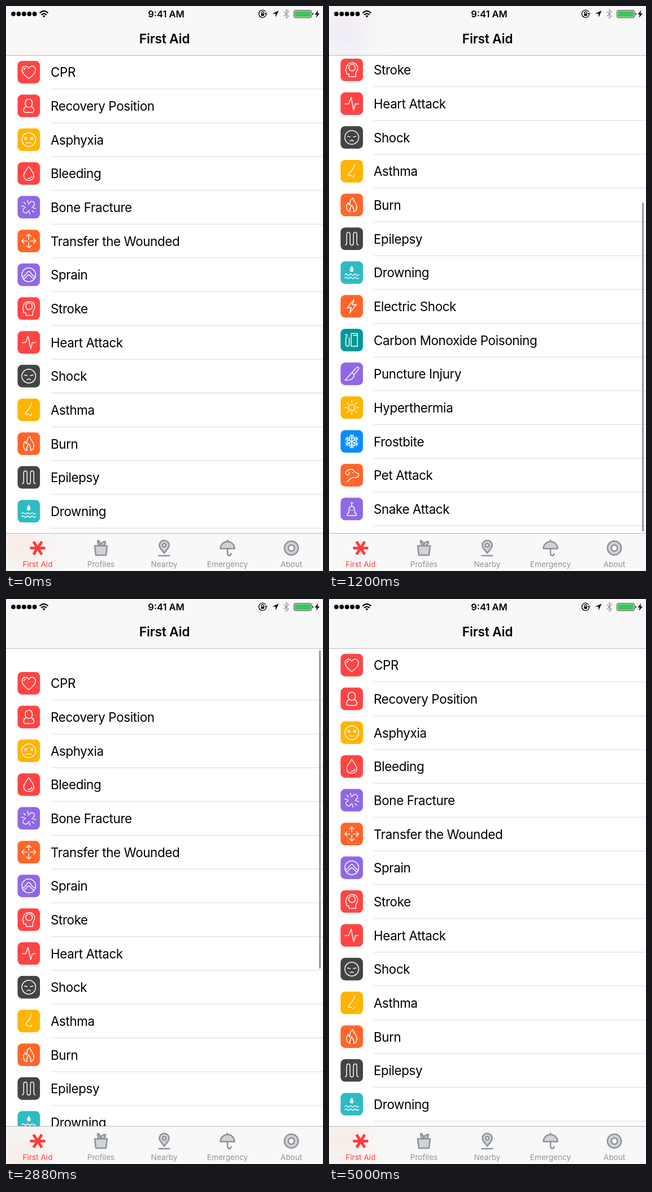
Animation, 561 px wide and 998 px high, one loop 5.04 s. Source, as an HTML page:

```html
<!DOCTYPE html>
<html lang="en">
<head>
<meta charset="utf-8">
<title>First Aid</title>
<style>
html, body { margin: 0; width: 100%; height: 100%; overflow: hidden; background: #fff; }
#stage { position: absolute; left: 0; top: 0; width: 561px; height: 998px; overflow: hidden; background: #fff; }
svg { position: absolute; left: 0; top: 0; display: block; }
text { font-family: Inter, Roboto, sans-serif; }
.bar { position: absolute; left: 0; width: 561px; overflow: hidden; background: #f8f8f8; }
#nav { top: 0; height: 88px; }
#tabs { top: 931px; height: 67px; }
.row text { font-size: 22.4px; letter-spacing: -.38px; }
.icon { fill: none; stroke: #fff; stroke-width: 1.45; stroke-linecap: round; stroke-linejoin: round; }
.title { font-size: 22.8px; font-weight: 600; letter-spacing: -.25px; }
.clock { font-size: 16.5px; font-weight: 600; }
.tab text { font-size: 13.5px; letter-spacing: .05px; }
.mid { text-anchor: middle; }
.tab { fill: #929297; }
.tab g { fill: #d0d2d6; stroke: #8d9299; stroke-width: 2.5; stroke-linejoin: round; stroke-linecap: round; }
.tab.on { fill: #ff3b3b; }
.tab.on g { stroke: #ff3b3b; stroke-width: 4.8; stroke-linecap: butt; }
</style>
</head>
<body>
<div id="stage">
  <svg width="561" height="998"><defs id="glows"></defs><g id="list"></g></svg>
  <div class="bar" id="nav">
    <svg width="561" height="88">
      <g id="navTint"></g>
      <g id="dots"></g>
      <g fill="none" stroke="#000" stroke-width="2.3">
        <path d="M59.6 12.4Q67 5.4 74.4 12.4M62.4 15.6Q67 11.2 71.6 15.6"/>
        <path d="M64.6 17.6Q67 15.6 69.4 17.6L67 20.2Z" fill="#000" stroke="none"/>
      </g>
      <text class="clock mid" x="283.5" y="20">9:41 AM</text>
      <g fill="none" stroke="#000" stroke-width="1.3">
        <path d="M459.6 10.2A6.6 6.6 0 1 0 460.6 14.5M461.8 11.8L460.4 14.8L457.9 12.6"/>
        <path d="M452.2 13.4V11.8A1.9 1.9 0 0 1 456 11.8V13.4"/>
        <rect x="451.4" y="13.4" width="5.4" height="4" fill="#000" stroke="none"/>
        <path d="M482.6 8.2L471.2 13.6H477V20Z" fill="#000" stroke="none"/>
        <path d="M491.6 9.8L500.2 18L496 21.6V6.4L500.2 10L491.6 18.2" stroke="#9b9b9f"/>
        <rect x="509.6" y="7.6" width="31" height="13" rx="2.4" stroke="#333" stroke-width="1"/>
        <rect x="511" y="9" width="28.2" height="10.2" rx="1.2" fill="#3cc65a" stroke="none"/>
        <path d="M542 11.8Q544 12 544 14T542 16.4Z" fill="#333" stroke="none"/>
        <path d="M552.4 7.6L546.4 15H550L548.6 20.8L555 13.2H551.2Z" fill="#000" stroke="none"/>
      </g>
      <text class="title mid" x="280.5" y="65.5">First Aid</text>
      <rect y="86.8" width="561" height="1" fill="#b8b8ba"/>
    </svg>
  </div>
  <div class="bar" id="tabs">
    <svg width="561" height="67"><g id="tabTint"></g><g id="tabArt"></g></svg>
  </div>
  <svg width="561" height="998">
    <rect id="thumb" x="554" width="3.2" rx="1.6" fill="#98989b"/>
  </svg>
</div>
<script>
const $ = id => document.getElementById(id);
const path = d => `<path d="${d}"/>`;
const circle = (x, y, r) => `<circle cx="${x}" cy="${y}" r="${r}"/>`;
const dot = (x, y) => `<circle cx="${x}" cy="${y}" r="1" fill="#fff" stroke="none"/>`;
const turn = (angles, d) => angles.map(a => `<path transform="rotate(${a})" d="${d}"/>`).join('');
const around = n => Array.from({ length: n }, (_, i) => i * 360 / n);
const clamp = (v, lo, hi) => Math.max(lo, Math.min(hi, v));

const RED = '#ff4444', YELLOW = '#ffb400', PURPLE = '#8f68e6', ORANGE = '#ff6529',
  DARK = '#444444', AQUA = '#2fbbc4', TEAL = '#059798', BLUE = '#0a8cff';

const rows = [
  ['CPR', RED, path('M0 11.5C-6 6.5-12 2-12-4C-12-8-9-10.5-6-10.5C-3-10.5-1-8.5 0-6.5C1-8.5 3-10.5 6-10.5C9-10.5 12-8 12-4C12 2 6 6.5 0 11.5ZM-8.6-4Q-8.4-7-5.6-7.2')],
  ['Recovery Position', RED, path('M-4 1C-8-3-6.5-12 0-12S8-3 4 1C8 2 9 5 9 8Q9 11.5 6 11.5H-6Q-9 11.5-9 8C-9 5-8 2-4 1Q0 4 4 1')],
  ['Asphyxia', YELLOW, circle(0, 0, 12.2) + path('M-7-4L-3.5-.5M-3.5-4L-7-.5M3.5-4L7-.5M7-4L3.5-.5M-4.5 5.5H4.5')],
  ['Bleeding', RED, path('M0-12.5C4-6.5 9-.5 9 4A9 8.5 0 0 1-9 4C-9-.5-4-6.5 0-12.5ZM5.5 4.5Q5 8-1 9')],
  ['Bone Fracture', PURPLE, turn([45, 225], 'M-4.5-3.5V-8A4.5 4.5 0 0 1 4.5-8V-3.5') + turn([-80, -45, -10, 100, 135, 170], 'M0-8.5V-12.5')],
  ['Transfer the Wounded', ORANGE, turn(around(4), 'M0-2.5V-12M-4-8.5L0-12.2L4-8.5')],
  ['Sprain', PURPLE, circle(0, 0, 12.2) + path('M-11 3.5C-5 3-4-6 0-6S5 3 11 3.5M-9 7C-5 6.5-3 0 0 0S5 6.5 9 7')],
  ['Stroke', RED, path('M-5 12V7.5H-8Q-9.5 7.5-9.5 5V2L-11.2 1L-9.3-4C-9-10-4-12.5 1-12.5C7-12.5 10.5-8 10.5-3C10.5 2 7 3 7 7V12Z') + circle(.5, -4, 5.8)],
  ['Heart Attack', RED, path('M-12 .5H-5.5L-1.2-11L3.4 11L6.4 .5H12')],
  ['Shock', DARK, circle(0, 0, 12.2) + path('M-7.5-2L-3-1M3-1L7.5-2M-3 6.5Q0 3.5 3 6.5')],
  ['Asthma', YELLOW, path('M4.5-12C5.5-4-5.5 2-5.5 6.5C-5.5 9.5-2 7.5 0 8M4.5 6.5Q5 10 1.5 11')],
  ['Burn', ORANGE, path('M-3 12.5C-12 9.5-10-1-6-4C-6-1-4.5 0-3 0C-4-5-2-10 2-13C2-7 9-4 9 4C9 8 7 11.5 3 12.5C5 8 2.5 5 0 0C-2.5 5-5 8-3 12.5Z')],
  ['Epilepsy', DARK, path('M-11.5 11Q-9 11-9 7V-8A3 3.5 0 0 1-3-8V8A3 3.5 0 0 0 3 8V-8A3 3.5 0 0 1 9-8V7Q9 11 11.5 11')],
  ['Drowning', AQUA, '<path fill="#fff" stroke="none" d="M0-12C1.8-8.6 3.2-7 3.2-4.6A3.2 3.2 0 0 1-3.2-4.6C-3.2-7-1.8-8.6 0-12Z"/>' + path('M-12 3.8q2-2.6 4 0t4 0t4 0t4 0t4 0t4 0M-12 9.6q2-2.6 4 0t4 0t4 0t4 0t4 0t4 0')],
  ['Electric Shock', ORANGE, path('M4-12L-8 2.5H-1L-4 12L8-3H1Z')],
  ['Carbon Monoxide Poisoning', TEAL, path('M-1-11.5H10V11H-1ZM2.5-8H10M-11.5-9.5H-8.5V-5M-10.5-5V7Q-10.5 11-7 11Q-4.5 11-4.5 7V-4')],
  ['Puncture Injury', PURPLE, path('M-12 11.5L.5-2.5L4 1.5C4 8-2 11.5-12 11.5ZM.5-2.5L8.5-11Q10.5-12.8 12-11.2T11.2-7L4 1.5')],
  ['Hyperthermia', YELLOW, circle(0, 0, 5.8) + turn(around(8), 'M0-9.2V-12.2')],
  ['Frostbite', BLUE, turn(around(6), 'M0 0V-12M-3-11L0-8.5L3-11M-4-8L0-4.5L4-8')],
  ['Pet Attack', ORANGE, path('M-11.5-3C-9-10-2-11.5 3-9C5-5 9-4 12-2.5C13 1 11 4 7 4H3C-1 5-5 8-8.5 12M-11.5-3C-9 1.5-4 0-4-5.5') + dot(2, -4.5)],
  ['Snake Attack', PURPLE, path('M-8 11.5V9Q-8 7-5.5 7C-5 0-5-4.5 0-4.5S5 0 5.5 7Q8 7 8 9V11.5ZM0-4.5V-10L-1.8-11.6M0-10L2.4-11') + dot(-2, 2) + dot(2, 2)]
];

const TOP = 87.2, PITCH = 59.66;
$('list').innerHTML = rows.map(([name, color, art], i) => `
  <g class="row" transform="translate(0 ${(TOP + i * PITCH).toFixed(2)})">
    <rect x="20.5" y="9.7" width="39.6" height="39.8" rx="8" fill="${color}"/>
    <g class="icon" transform="translate(40.3 29.6)">${art}</g>
    <text x="79" y="38.1">${name}</text>
    <rect x="79" y="59" width="482" height="1" fill="#d9d9dc"/>
  </g>`).join('');

// Soft glows stand for the icons seen through the frosted bars.
const glowId = color => 'glow' + color.slice(1);
$('glows').innerHTML = [...new Set(rows.map(r => r[1]))].map(color =>
  `<radialGradient id="${glowId(color)}">` + [0, .2, .4, .6, .8, 1].map(o =>
    `<stop offset="${o}" stop-color="${color}" stop-opacity="${(.09 * Math.exp(-4 * o * o) * (1 - o)).toFixed(4)}"/>`
  ).join('') + '</radialGradient>').join('');

const bars = [['navTint', 0, 87], ['tabTint', 931, 998]].map(([id, top, bottom]) => {
  $(id).innerHTML = rows.map(r => `<circle cx="28" r="110" fill="url(#${glowId(r[1])})"/>`).join('');
  return { top, bottom, glows: [...$(id).children] };
});

$('dots').innerHTML = [13, 22.4, 31.8, 41.2, 50.6].map(x => circle(x, 14, 3.9)).join('');

const tabs = [
  ['First Aid', 56, turn([0, 57, 123], 'M-13.5 0H13.5')],
  ['Profiles', 168, path('M-1-4C-5-5-6.5-9-5.5-13.5Q-1-11.5-.5-4C0-9 3-11.5 8-11.5Q8-6 3-4M-11-4H11L9 12.5H-9Z')],
  ['Nearby', 280, path('M0 9C-4 3-8.6 0-8.6-5A8.6 8.6 0 0 1 8.6-5C8.6 0 4 3 0 9ZM-9.5 13.5H9.5') + '<circle cy="-5" r="3" fill="#f8f8f8"/>'],
  ['Emergency', 392, path('M-12.5 1A12.5 12.5 0 0 1 12.5 1ZM0-11.5V-14') + '<path fill="none" d="M0 1V10A3.2 3.2 0 0 0 6.4 10"/>'],
  ['About', 505, circle(0, 0, 12.2) + '<circle r="5.4" fill="#f8f8f8"/>']
];
$('tabArt').innerHTML = '<rect width="561" height="1" fill="#b8b8ba"/>' + tabs.map(([name, x, art], i) => `
  <g class="tab${i ? '' : ' on'}">
    <g transform="translate(${x} 26.5)">${art}</g>
    <text class="mid" x="${x}" y="60">${name}</text>
  </g>`).join('');

const LOOP = 5040, STEP = 40, MAX = 408.5;
const GLIDE = 500, SPRING = .0109;

// Drag: cubic from a to b with end speeds, in px per ms.
function drag(t, t0, t1, a, b, va, vb) {
  const d = t1 - t0, u = (t - t0) / d, w = 1 - u;
  return w * w * (1 + 2 * u) * a + u * u * (3 - 2 * u) * b + d * u * w * (w * va - u * vb);
}
const glide = (dt, v) => v * GLIDE * (1 - Math.exp(-dt / GLIDE));
const bounce = (dt, v) => v * dt * Math.exp(-SPRING * dt);

function scrollAt(t) {
  if (t < 560) return 0;
  if (t < 660) return drag(t, 560, 660, 0, 100, 0, 1.5);
  if (t < 840) return drag(t, 660, 840, 100, 276, 1.5, .655);
  if (t < 1099) return 276 + glide(t - 840, .655);
  if (t < 2440) return MAX + bounce(t - 1099, .39);
  if (t < 2560) return drag(t, 2440, 2560, MAX, 336, 0, -1.677);
  if (t < 2816) return 336 - glide(t - 2560, 1.677);
  return -bounce(t - 2816, 1.005);
}

const fade = (t, on, off) => t < on ? 0 : clamp(1 - (t - off) / 250, 0, 1);

// Each glow is as strong as the share of its icon that lies under the bar.
function tint({ top, bottom, glows }, s) {
  glows.forEach((glow, i) => {
    const y = TOP + i * PITCH + 29.6 - s;
    const under = Math.min(bottom, y + 20) - Math.max(top, y - 20);
    glow.setAttribute('cy', (y - top).toFixed(2));
    glow.setAttribute('opacity', clamp(under / 40, 0, 1).toFixed(3));
  });
}

function draw(t) {
  const s = scrollAt(t);
  $('list').setAttribute('transform', `translate(0 ${(-s).toFixed(2)})`);
  bars.forEach(bar => tint(bar, s));

  // The thumb shrinks by as much as the list is pulled past its end.
  const inside = clamp(s, 0, MAX);
  const over = s - inside;
  const y = 91 + inside / MAX * 243 + Math.max(0, over);
  const thumb = $('thumb');
  thumb.setAttribute('y', y.toFixed(2));
  thumb.setAttribute('height', (594 - Math.abs(over)).toFixed(2));
  thumb.setAttribute('opacity', Math.max(t < 2440 ? fade(t, 560, 1750) : 0, fade(t, 2480, 3550)));
}

function tick() {
  const t = performance.now() % LOOP;
  draw(Math.floor(t / STEP) * STEP);
  requestAnimationFrame(tick);
}
tick();
</script>
</body>
</html>
```
